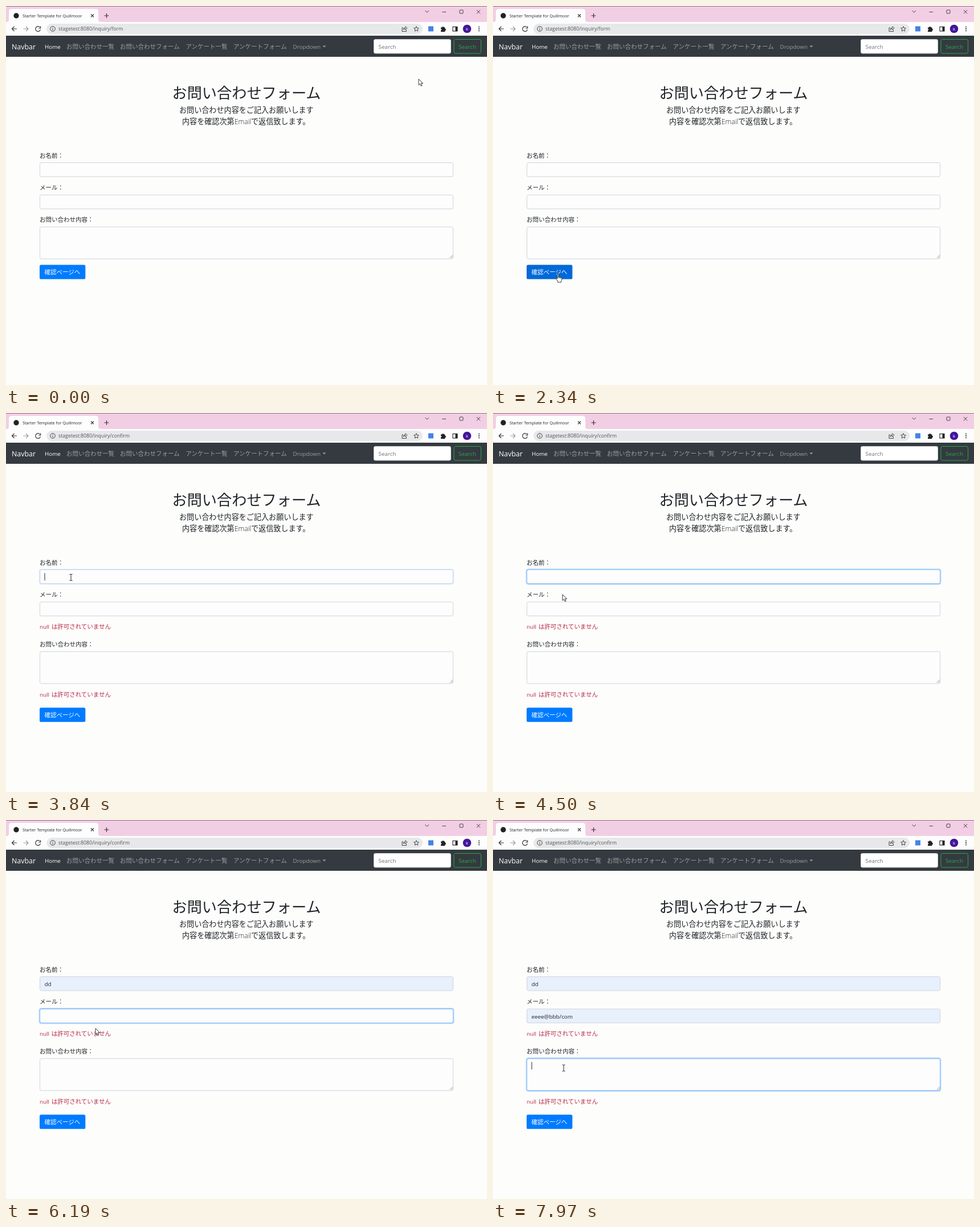
Write an HTML page that moves like this. It is 844x664 px and loops after 8000 ms.

```html
<!DOCTYPE html>
<html lang="ja">
<head>
<meta charset="utf-8">
<title>Inquiry form</title>
<style>
  html, body { margin: 0; width: 100%; height: 100%; overflow: hidden; background: #fdfdfc; }
  svg { display: block; width: 844px; height: 664px; }
  text { font: 9.85px "Open Sans", "Noto Sans", sans-serif; fill: #212529; white-space: pre; }
  .ja { font: 10.5px "Noto Sans CJK JP", "Noto Sans CJK", sans-serif; }
  .lead { font-size: 13.1px; font-weight: 300; }
  .nav text { fill: #999da0; }
  .error text { fill: #b92a48; }
  .icon { fill: none; stroke: #333; stroke-width: 1.2; }
  .thin { stroke-width: .9; }
  .field rect { fill: #fdfdfd; stroke: #ced4da; }
  .field .ring { fill: none; stroke: #007bff; stroke-opacity: .25; stroke-width: 2.2; }
  .field .edge { fill: none; stroke: #80bdff; }
  .caret { stroke: #222; stroke-width: 1; }
  .pointer { fill: #fff; stroke: #222; stroke-width: .9; stroke-linejoin: round; }
</style>
</head>
<body>
<svg viewBox="0 0 844 664">
  <rect width="844" height="664" fill="#fdfdfc"/>

  <!-- Browser frame -->
  <rect width="844" height="29" fill="#f2cee4"/>
  <rect width="844" height="1" fill="#94708a"/>
  <path d="M1 28q4 0 4-4V10q0-5 5-5h147q5 0 5 5v14q0 4 4 4z" fill="#fdfdfd"/>
  <rect y="28" width="844" height="24" fill="#fdfdfd"/>
  <circle cx="18" cy="17" r="4.7" fill="#222"/>
  <text x="29" y="20" style="font-size:7.3px">Starter Template for Quillmoor</text>
  <g class="icon">
    <path d="M149 14.500l5 5m0-5l-5 5M172.500 17h8m-4-4v8"/>
    <path class="thin" d="M735.500 8l3.300 3.300L742 8M765.500 10.500h6.500M825.800 7l6.400 6.400m0-6.400l-6.400 6.400"/>
    <rect class="thin" x="796" y="7" width="6" height="6" rx="1"/>
    <path d="M19 40h-8.500m4-4l-4 4 4 4"/>
    <path d="M30.500 40H39m-4-4l4 4-4 4" stroke="#999"/>
    <path d="M59.500 37.200a4.400 4.400 0 1 0 .9 4.200M60.600 35.500v3.500h-3.500"/>
  </g>
  <rect x="71" y="31" width="660" height="18" rx="9" fill="#e7e8ea"/>
  <g class="icon thin" stroke="#555">
    <circle cx="82" cy="40" r="4.300"/>
    <path d="M82 39.300v3.200M82 37.300v1"/>
    <path d="M697 38h-2v6.500h7.500V42M697 41.500q.5-3.500 4-3.700v-2l3 3-3 3v-2q-2.500 0-4 1.700z"/>
    <path d="M720 35.700l1.200 2.900 3.100.3-2.300 2.100.7 3.100-2.700-1.700-2.700 1.700.7-3.100-2.300-2.100 3.100-.3z"/>
  </g>
  <text id="address" x="92" y="43.200" style="font-size:8.680px;fill:#555"></text>
  <rect x="741" y="35.500" width="9" height="9" fill="#4582e6"/>
  <path d="M763 37.500h2.200a1.600 1.600 0 0 1 3.200 0h2v2.300a1.600 1.600 0 0 1 0 3.200v2.200H763v-2.600a1.300 1.300 0 0 0 0-2.600z" fill="#222"/>
  <rect x="784" y="36.500" width="8" height="7.500" class="icon"/>
  <rect x="788.500" y="36.500" width="3.500" height="7.500" fill="#222"/>
  <circle cx="809" cy="40" r="7.300" fill="#43159a"/>
  <text x="809" y="42.700" text-anchor="middle" style="font-size:7.500px;fill:#fff">k</text>
  <path d="M830 35.700v1.800M830 39.100v1.800M830 42.500v1.800" stroke="#333" stroke-width="1.800"/>

  <!-- Page navigation -->
  <rect y="52" width="844" height="37" fill="#343a40"/>
  <g class="nav">
    <text x="10" y="76" style="font-size:12.400px;fill:#fff">Navbar</text>
    <text x="68" y="74.700" style="fill:#fff">Home</text>
    <text class="ja" x="106" y="75">お問い合わせ一覧</text>
    <text class="ja" x="200" y="75">お問い合わせフォーム</text>
    <text class="ja" x="315.500" y="75">アンケート一覧</text>
    <text class="ja" x="399" y="75">アンケートフォーム</text>
    <text x="503.500" y="74.700">Dropdown</text>
    <path d="M555.500 69.500h6l-3 3z" fill="#999da0"/>
    <rect x="645.500" y="58.500" width="135" height="24.500" rx="2.600" fill="#fff" stroke="#ced4da"/>
    <text x="653.500" y="75" style="fill:#6c757d">Search</text>
    <rect x="786" y="58.500" width="47.500" height="24.500" rx="2.600" fill="none" stroke="#28a745"/>
    <text x="794" y="74.700" style="fill:#28a745">Search</text>
  </g>

  <!-- Form -->
  <text class="ja" x="422" y="162.300" text-anchor="middle" style="font-size:26.200px;font-weight:350">お問い合わせフォーム</text>
  <text class="ja lead" x="304" y="187.300">お問い合わせ内容をご記入お願いします</text>
  <text class="ja lead" x="309" y="207">内容を確認次第</text>
  <text class="lead" x="400.800" y="206.800" style="font-size:12.200px">Email</text>
  <text class="ja lead" x="430" y="207">で返信致します。</text>
  <text class="ja" x="59" y="265.500">お名前：</text>
  <text class="ja" x="59" y="321.800">メール：</text>
  <g id="name"></g>
  <g id="mail"></g>
  <g id="lower">
    <text class="ja" x="59" y="377.800">お問い合わせ内容：</text>
    <g id="body"></g>
    <path d="M779 441.500l5-5m-2 5l2-2" stroke="#777" stroke-width=".8"/>
  </g>
  <g class="error" id="errors">
    <text x="59" y="377.600">null</text><text class="ja" x="79.700" y="377.800">は許可されていません</text>
    <text x="59" y="496.600">null</text><text class="ja" x="79.700" y="496.800">は許可されていません</text>
  </g>
  <g id="submit">
    <rect x="59" y="453.500" width="80.300" height="25" rx="2.600"/>
    <text class="ja" x="67.500" y="470" style="fill:#fff">確認ページへ</text>
  </g>

  <!-- Mouse pointers, drawn around their hot spots -->
  <g id="arrow"><path class="pointer" d="M0 0v10.500l2.400-2.200 1.700 3.900 1.900-.8-1.700-3.800h3.300z"/></g>
  <g id="hand"><path class="pointer" d="M-1 .8Q0-.5 1 .8V5.500l1.800.1 1.900.6 1.700.8q.7.400.6 1.500-.1 3-1.500 4.700V15H-.2v-1.500L-3 9.500q-.8-1.400.4-1.800.8-.1 1.600 1.300zM1 5.500V8M3 6v2M5 6.500V8.500"/></g>
  <g id="beam"><path d="M-2.500-5.500h2L0-5l.5-.5h2M0-5v10M-2.500 5.500h2L0 5l.5.500h2" fill="none" stroke="#222"/></g>
</svg>
<script>
const LOOP = 8000, PAGE_CHANGE = 2900, BLINK = 530;
const $ = id => document.getElementById(id);
const clamp = v => Math.max(0, Math.min(1, v));
const show = (el, on) => el.setAttribute('visibility', on ? 'visible' : 'hidden');
const move = (el, x, y) => el.setAttribute('transform', `translate(${x} ${y})`);

// focus and blur bound the focused time; fill is when a suggestion is accepted.
const fields = [
  { id: 'name', y: 274.5, h: 24.5, focus: 3800, blur: 5600, fill: 4600, value: 'dd' },
  { id: 'mail', y: 331, h: 24.5, focus: 5600, blur: 7700, fill: 6700, value: 'eeee@bbb/com' },
  { id: 'body', y: 387, h: 56, focus: 7700, blur: Infinity, fill: Infinity, value: '' }
];

for (const f of fields) {
  const box = (cls, grow) => `<rect class="${cls}" x="${59.5 - grow}" y="${f.y - grow}"
    width="${725 + 2 * grow}" height="${f.h + 2 * grow}" rx="${2.6 + grow}"/>`;
  const g = $(f.id);
  g.setAttribute('class', 'field');
  g.innerHTML = box('back', 0) + `<g>${box('ring', 1)}${box('edge', 0)}</g>` +
    `<text x="67.5" y="${f.y + 16.5}">${f.value}</text>` +
    `<path class="caret" d="M.5 ${f.y + 6}v13"/>`;
  [f.back, f.glow, f.text, f.caret] = g.children;
}

// Mouse stops: time, x, y
const path = [
  [0, 724, 128], [700, 724, 128], [2150, 114, 469], [3100, 114, 469],
  [3700, 114, 288], [4000, 114, 288], [4450, 122, 318], [4700, 122, 318],
  [5250, 141, 343.5], [5700, 141, 343.5], [6190, 157, 365], [6600, 145, 398],
  [7130, 142, 400], [7300, 142, 400], [7750, 124, 434.5], [LOOP, 124, 434.5]
];

function mouseAt(t) {
  const i = path.findIndex(p => p[0] > t);
  const [t0, x0, y0] = path[i - 1], [t1, x1, y1] = path[i];
  const u = (t - t0) / (t1 - t0), e = u * u * (3 - 2 * u);
  return [x0 + (x1 - x0) * e, y0 + (y1 - y0) * e];
}

function draw(t) {
  const checked = t >= PAGE_CHANGE, drop = checked ? 31 : 0;
  $('address').textContent = 'stagetest:8080/inquiry/' + (checked ? 'confirm' : 'form');
  show($('errors'), checked);
  move($('lower'), 0, drop);
  const submitDrop = checked ? 62.8 : 0;
  move($('submit'), 0, submitDrop);

  for (const f of fields) {
    const filled = t >= f.fill, focused = t >= f.focus && t < f.blur;
    f.back.style.fill = filled ? '#e8f0fe' : '';
    f.glow.setAttribute('opacity', clamp((t - f.focus) / 150) - clamp((t - f.blur) / 150));
    show(f.text, filled);
    show(f.caret, focused && (t - (filled ? f.fill : f.focus)) % (2 * BLINK) < BLINK);
    move(f.caret, 67.5 + (filled ? f.text.getComputedTextLength() : 0), 0);
  }

  const [x, y] = mouseAt(t);
  const within = (top, height, right) => x > 59 && x < right && y > top && y < top + height;
  const onButton = within(453.5 + submitDrop, 25, 139);
  const onField = fields.some(f => within(f.y + (f.id === 'body' ? drop : 0), f.h, 785));
  const kind = onButton ? 'hand' : onField ? 'beam' : 'arrow';
  $('submit').setAttribute('fill', onButton ? '#0069d9' : '#007bff');
  for (const id of ['arrow', 'hand', 'beam']) {
    show($(id), id === kind);
    move($(id), x, y);
  }
}

const start = performance.now();
function tick() {
  draw((performance.now() - start) % LOOP);
  requestAnimationFrame(tick);
}
tick();
</script>
</body>
</html>
```
